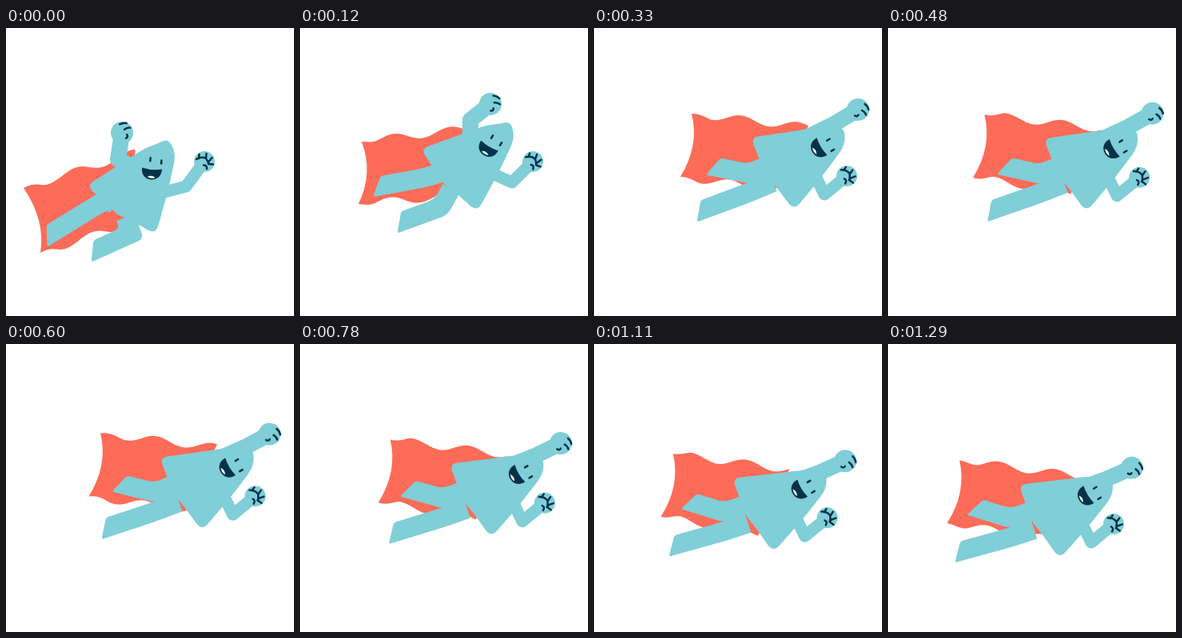
Write an HTML page that moves like this. It is 360 by 360 pixels and loops after 1320 ms.

```html
<!DOCTYPE html>
<html lang="en">
<head>
<meta charset="utf-8">
<title>Flying hero</title>
<style>
  html, body { margin: 0; width: 100%; height: 100%; overflow: hidden; background: #fff; }
  svg { display: block; width: 100vw; height: 100vh; }
  .skin { fill: #80ced7; }
  .limb { fill: none; stroke: #80ced7; stroke-linecap: round; stroke-linejoin: round; }
  .ink { fill: none; stroke: #003249; stroke-width: 2.5; stroke-linecap: round; stroke-linejoin: round; }
</style>
</head>
<body>
<svg viewBox="0 0 360 360">
  <path id="cape" fill="#fd6c58"/>
  <path id="legA" class="skin"/>
  <path id="legB" class="skin"/>
  <path id="torso" class="skin"/>
  <path id="armA" class="limb" stroke-width="20"/>
  <path id="armB" class="limb" stroke-width="15"/>
  <g id="fistA">
    <circle class="skin" r="14"/>
    <path class="ink" d="M8.5 -7Q12.5 -4 13.3 0M5 1Q9 3 10 6.5M-4 7.5Q-1 9.5 .5 6.5"/>
  </g>
  <g id="fistB">
    <circle class="skin" r="13"/>
    <path class="ink" d="M-10 -3Q-4 -7 2 -4L6 3M-7 -4L-6.5 -9M2 -4L2.5 -10M4.5 1L9.5 -5M5 3L11 3.5M-1 4.5Q3 4 3 9"/>
  </g>
  <g id="face">
    <path fill="#003249" d="M-12.5 0Q0 3 12.5 0C13 9 7 14 0 14S-13 9 -12.5 0Z"/>
    <path fill="#fff" d="M-5 11Q0 7.5 5 11Q0 13.5 -5 11Z"/>
    <path class="ink" d="M-3 -13V-9M11 -11V-7"/>
  </g>
</svg>
<script>
const LOOP = 1320, STEP = 30, PEAK = 330, LAUNCH = 120;
const RAD = Math.PI / 180;

// Joints when crouched, launching and fully stretched; a third value is an angle
const joints = {
  body:   [[101, 197, -24], [151, 151, -11], [196, 137, 0]],
  face:   [[182.5, 175.5, 5], [237, 147, 31], [285, 148, 59]],
  elbowA: [[140, 164], [213, 115], [300, 120]],
  fistA:  [[145, 131, -65], [238, 95, -31], [330, 102, 0]],
  elbowB: [[225, 198], [265, 193], [288, 208]],
  fistB:  [[248, 167, 0], [291, 167, 16], [316, 185, 30]],
  kneeA:  [[124, 215], [152, 188], [194, 182]],
  toeA:   [[51, 260], [96, 198], [149, 173]],
  kneeB:  [[157, 257], [176, 224], [193, 206]],
  toeB:   [[108, 279], [124, 243], [131, 229]],
  hemTop: [[22, 200], [77, 142], [122, 107]],
  hemLow: [[43, 281], [73, 220], [108, 186]]
};

// Torso outline in body space: x, y, corner radius
const torso = [
  [104, -12, 6], [117, -12, 10], [118, 9, 12], [92, 45, 20], [54, 91, 12], [33, 63, 3],
  [20, 48, 0], [10, 25, 3], [0, 0, 10], [66, -10, 8], [84, -13, 6]
];

// How far each part turns while falling back: angle and pivot
const swing = {
  cape: [1, 230, 180], torso: [2, 230, 180],
  legA: [6, 230, 110], legB: [5, 230, 110],
  armA: [7, 230, 180], fistA: [7, 230, 180]
};

const $ = id => document.getElementById(id);
const mix = (a, b, p) => a.map((v, i) => v + (b[i] - v) * p);
const xy = p => p[0].toFixed(2) + ' ' + p[1].toFixed(2);
const line = pts => 'M' + pts.map(xy).join('L');
const polar = (p, a, r) => [p[0] + r * Math.cos(a), p[1] + r * Math.sin(a)];
const heading = (p, q) => Math.atan2(q[1] - p[1], q[0] - p[0]);

// Decelerating parabola through the three poses, at rest at the peak
function lunge(t) {
  const warp = u => 1 - (1 - u / PEAK) ** 2;
  const s = warp(Math.min(t, PEAK)), m = warp(LAUNCH);
  const a = (s - m) * (s - 1) / m, b = s * (s - 1) / (m * (m - 1)), c = s * (s - m) / (1 - m);
  const pose = {};
  for (const id in joints) {
    const [p, q, r] = joints[id];
    pose[id] = p.map((v, i) => v * a + q[i] * b + r[i] * c);
  }
  return pose;
}

// Slow fall back after the peak
function drift(t) {
  const s = Math.max(0, (t - PEAK) / (LOOP - STEP - PEAK));
  const bow = v => 1 - Math.cos(.8 * Math.PI * v);
  const x = -34 * s ** 1.6, y = 40 * bow(s) / bow(1), turn = Math.sin(s * Math.PI / 2);
  return id => {
    const [a, px, py] = swing[id] || [0, 0, 0];
    return `translate(${x} ${y}) rotate(${a * turn} ${px} ${py})`;
  };
}

function rounded(pts) {
  const n = pts.length;
  const toward = (p, q, r) => mix(p, q, Math.min(r / Math.hypot(q[0] - p[0], q[1] - p[1]), .5));
  return pts.map((p, i) => (i ? 'L' : 'M') + xy(toward(p, pts[(i + n - 1) % n], p[2])) +
    'Q' + xy(p) + ' ' + xy(toward(p, pts[(i + 1) % n], p[2]))).join('') + 'Z';
}

// Ribbon of even width, mitred at the knee, cut at a slant at the toe
function leg(hip, knee, toe) {
  const half = 12, a = heading(hip, knee), b = heading(knee, toe);
  const bend = Math.atan2(Math.sin(b - a), Math.cos(b - a)) / 2;
  const side = k => [
    [...polar(hip, a - Math.PI / 2, k * half), 0],
    [...polar(knee, a + bend - Math.PI / 2, k * half / Math.cos(bend)), 8],
    [...polar(toe, b - 60 * RAD, k * half / Math.sin(60 * RAD)), 3]
  ];
  return rounded([...side(1), ...side(-1).reverse()]);
}

// Cape edge with a wave that runs towards the hem
function edge(hem, end, t) {
  const n = 30, size = Math.hypot(end[0] - hem[0], end[1] - hem[1]);
  const crest = 62 - .235 * (t - PEAK);
  return Array.from({ length: n + 1 }, (_, i) => {
    const d = size * i / n, [x, y] = mix(hem, end, i / n);
    return [x, y - 5 * Math.min(1, d / 25) * Math.cos(2 * Math.PI * (d - crest) / 71)];
  });
}

function draw(t) {
  const p = lunge(t), place = drift(t);
  const [bx, by, ba] = p.body, cos = Math.cos(ba * RAD), sin = Math.sin(ba * RAD);
  const onBody = (x, y) => [bx + x * cos - y * sin, by + x * sin + y * cos];

  const top = edge(p.hemTop, onBody(72, -13), t);
  const low = edge(p.hemLow, onBody(34, 66), t).reverse();
  const fold = mix(p.hemTop, p.hemLow, .5);
  fold[0] += 17;

  const shapes = {
    cape: line([...top, ...low]) + 'Q' + xy(fold) + ' ' + xy(p.hemTop) + 'Z',
    legA: leg(onBody(22, 34), p.kneeA, p.toeA),
    legB: leg(onBody(28, 56), p.kneeB, p.toeB),
    torso: rounded(torso.map(([x, y, r]) => [...onBody(x, y), r])),
    armA: line([onBody(62, 4), p.elbowA, p.fistA]),
    armB: line([onBody(80, 46), p.elbowB, p.fistB])
  };
  for (const id in shapes) {
    $(id).setAttribute('d', shapes[id]);
    $(id).setAttribute('transform', place(id));
  }
  for (const id of ['fistA', 'fistB', 'face']) {
    const [x, y, a] = p[id];
    $(id).setAttribute('transform', `${place(id)} translate(${x} ${y}) rotate(${a})`);
  }
}

function tick() {
  const t = performance.now() % LOOP;
  draw(Math.floor(t / STEP) * STEP);
  requestAnimationFrame(tick);
}
tick();
</script>
</body>
</html>
```
